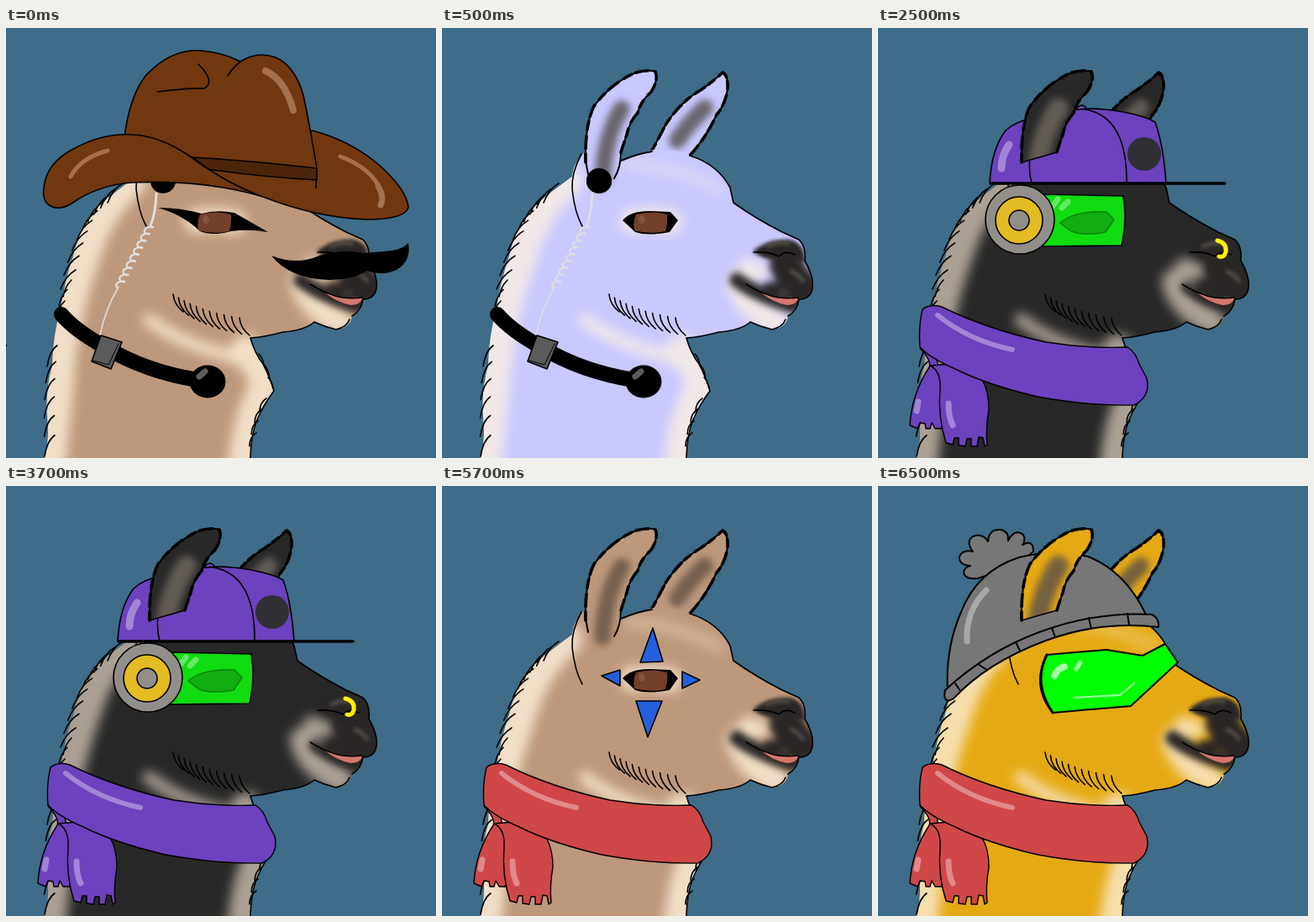
These frames come from a looping animation (512x512 px, 8000 ms). An HTML page:

```html
<!DOCTYPE html>
<html lang="en">
<head>
<meta charset="utf-8">
<title>Llama wardrobe</title>
<style>
html, body { margin: 0; width: 100%; height: 100%; overflow: hidden; background: #3e6c89; }
svg { display: block; width: 100%; height: 100%; }
.ln { fill: none; stroke: #000; stroke-linecap: round; stroke-linejoin: round; }
.ol { stroke: #000; stroke-linejoin: round; }
.base { fill: var(--base); }
.lit { fill: none; stroke: var(--lit); stroke-linecap: round; stroke-linejoin: round; }
.mid { fill: none; stroke: var(--mid); stroke-linecap: round; }
.scarf { fill: var(--scarf); }
.shine { fill: none; stroke: #fff; stroke-opacity: .36; stroke-linecap: round; }
.glint { stroke-opacity: .65; }
</style>
</head>
<body>
<svg viewBox="0 0 512 512" stroke-width="1.6">
<defs>
  <filter id="soft" filterUnits="userSpaceOnUse" x="0" y="0" width="512" height="512"><feGaussianBlur stdDeviation="7"/></filter>
  <filter id="blur" filterUnits="userSpaceOnUse" x="0" y="0" width="512" height="512"><feGaussianBlur stdDeviation="4.5"/></filter>
  <filter id="edge" filterUnits="userSpaceOnUse" x="0" y="0" width="512" height="512"><feGaussianBlur stdDeviation="2"/></filter>
  <path id="bodyShape" d="M46 512Q52 490 49 462Q47 430 55 402Q56 365 65 335Q70 300 80 272Q88 235 110 212Q130 195 155 177Q157 158 171 147L213 146L214 157Q235 149 252 145Q280 143 295 152Q328 162 343 190L347 208Q372 226 405 243L425 252Q434 261 432 277Q445 300 440 314Q437 323 425 323Q423 337 412 343Q410 357 393 359Q380 356 367 350Q356 360 330 362Q308 368 291 369Q296 387 306 400Q314 415 319 432Q306 450 301 462Q292 480 291 512Z"/>
  <path id="earShape" d="M171 160Q170 115 181 93Q202 65 231 53Q247 49 254 52Q258 62 249 76Q236 88 233 101Q223 112 220 127Q216 138 213 148Z"/>
  <path id="earLine" d="M171 160Q170 115 181 93Q202 65 231 53Q247 49 254 52Q258 62 249 76Q236 88 233 101Q223 112 220 127Q216 138 213 148"/>
  <path id="farLine" d="M250 146L267 114Q285 87 308 74Q325 62 334 53Q341 56 340 73Q337 92 327 103Q315 130 294 153"/>
  <clipPath id="bodyClip"><use href="#bodyShape"/></clipPath>
  <clipPath id="earClip"><use href="#earShape"/></clipPath>
  <clipPath id="farClip"><use href="#farLine"/></clipPath>
</defs>

<rect width="512" height="512" fill="#3e6c89"/>
<circle data-on="0" cy="378" r="1.3"/>

<!-- far ear -->
<g data-on="1234">
  <use href="#farLine" class="base"/>
  <g clip-path="url(#farClip)"><path class="mid" d="M280 134Q294 113 313 95" stroke-width="20" filter="url(#blur)"/></g>
  <use href="#farLine" class="ln" stroke-width="2"/>
  <use href="#farLine" class="ln" stroke-width="3.6" stroke-dasharray="9 7 14 5"/>
</g>

<!-- head and neck -->
<use href="#bodyShape" class="base"/>
<g clip-path="url(#bodyClip)">
  <g filter="url(#soft)" class="lit">
    <path stroke-width="42" d="M146 182Q108 215 92 270Q70 330 62 395Q58 450 50 520"/>
    <path stroke-width="38" d="M286 384L306 410L308 430Q288 465 283 520"/>
    <path stroke-width="15" d="M170 347Q205 374 252 386Q280 392 298 410"/>
    <path stroke-width="32" d="M354 303Q362 333 398 350"/>
    <path stroke-width="20" d="M364 284L380 290"/>
    <path data-on="013" stroke-width="29" d="M226 230Q246 226 272 231"/>
    <path data-on="134" stroke-width="14" opacity=".4" d="M225 163Q280 165 330 192"/>
  </g>
  <g filter="url(#blur)" fill="none" stroke="#2a2825" stroke-linecap="round">
    <path d="M410 282Q418 300 430 309" stroke-width="40"/>
    <path d="M389 309L400 311" stroke-width="14"/>
    <path data-on="0134" d="M351 300Q371 316 418 331" stroke-width="18"/>
    <path data-on="2" d="M366 309Q385 324 418 332" stroke-width="12"/>
  </g>
  <path d="M370 266Q387 251 414 252Q434 257 431 279Q414 274 404 277Q383 277 370 266Z" fill="#2a2825" filter="url(#edge)"/>
  <path d="M386 261Q398 254 414 257M414 289Q425 293 431 303" fill="none" stroke="#56524a" stroke-width="4" filter="url(#edge)"/>
  <path d="M371 267Q390 266 401 272Q409 264 420 270" class="ln"/>
  <path d="M376 312Q390 320 405 322Q416 319 424 322Q423 329 411 330Q393 327 376 312Z" fill="#d4776c"/>
  <path d="M362 305Q378 315 392 319Q405 323 424 321" class="ln"/>
</g>
<path class="ln" d="M295 152Q328 162 343 190L347 208Q372 226 405 243L425 252Q434 261 432 277Q445 300 440 314Q437 323 425 323Q423 337 412 343M409 347Q406 356 393 359Q380 356 367 350Q356 360 330 362Q308 368 291 369Q296 387 306 400Q314 415 319 432Q306 450 301 462Q292 480 291 512"/>
<path class="ln" d="M166 150Q154 172 155 192Q158 220 167 236"/>
<path class="ln" data-on="13" stroke-width="2" d="M213 158Q235 149 250 147"/>
<g id="fur" class="ln"></g>

<!-- eye -->
<g data-on="013">
  <path data-on="0" d="M181 214Q208 214 233 221Q250 216 272 220Q293 232 312 243Q290 239 268 242Q245 248 231 242Q210 222 181 214Z"/>
  <path data-on="13" d="M215 229Q225 217 250 218L272 219L281 229L271 243Q245 248 230 243Z"/>
  <path d="M231 222Q250 217 268 222Q269 233 266 242Q247 246 229 241Q227 230 231 222Z" fill="#74402b"/>
  <ellipse cx="238" cy="228" rx="4" ry="5" fill="#85533f"/>
</g>
<path data-on="3" class="ol" fill="#2560dc" d="M251 169L263 209L236 210ZM231 256L262 256L245 299ZM190 226L212 219L212 238ZM286 221L307 231L286 241Z"/>

<!-- collar and earpiece -->
<g data-on="01">
  <circle cx="187" cy="182" r="15"/>
  <g fill="none" stroke="#dedede" stroke-linecap="round">
    <path d="M179 197Q178 222 172 235" stroke-width="3"/>
    <path id="coil" stroke-width="2.2"/>
    <path d="M134 308Q118 336 112 365"/>
  </g>
  <path d="M66 341Q82 360 118 380Q166 409 228 419" fill="none" stroke="#000" stroke-width="18" stroke-linecap="round"/>
  <ellipse cx="240" cy="421" rx="21.5" ry="19.5"/>
  <path d="M230 415L237 409" class="shine" stroke-width="7"/>
  <path class="ol" fill="#5b5b5b" d="M113 366L138 374L125 406L102 397Z"/>
  <path class="ln" stroke-width="1" d="M134 376L122 401L104 396"/>
</g>

<!-- scarf -->
<g data-on="234">
  <g class="ol" stroke-width="1.4">
    <path class="scarf" d="M50 381Q64 396 61 404Q40 436 38 473L47 477L50 470L56 471L57 477L62 477L64 470L68 477L76 477V420L70 395Z"/>
    <path class="scarf" d="M62 402Q75 408 74 430Q71 463 81 494L89 496L91 488L96 488V497L104 498L106 489L111 489V498L118 498L120 487L125 488L127 498L130 496Q128 476 132 454Q132 432 124 419L85 400Z"/>
    <path class="scarf" d="M53 335Q62 328 76 332Q130 359 200 374Q250 382 297 380Q307 386 311 400L320 417Q325 439 305 449Q250 450 190 439Q130 425 92 406Q62 393 50 380Q48 355 53 335Z"/>
  </g>
  <path class="shine" stroke-width="6" d="M71 342Q108 372 160 383"/>
  <path class="shine" stroke-width="7" d="M84 447Q84 464 89 473M48 445L46 456"/>
</g>

<!-- cowboy hat and moustache -->
<g data-on="0">
  <g class="ol" fill="#71370e">
    <path d="M364 122Q408 133 443 162Q478 193 479 214Q474 228 430 228Q370 226 306 201L350 150Z"/>
    <path d="M141 130Q147 82 166 57Q197 24 232 27Q258 29 279 40Q299 27 321 35Q344 45 354 80Q360 107 370 166L369 191L306 201L200 160Z" stroke="none"/>
    <path d="M141 130Q147 82 166 57Q197 24 232 27Q258 29 279 40Q299 27 321 35Q344 45 354 80Q360 107 370 166L369 191" fill="none"/>
    <path fill="#4c2509" d="M222 154Q295 158 370 167V181Q300 177 240 168Z"/>
    <path d="M45 190Q48 160 82 143Q116 125 150 127Q182 128 218 152Q260 184 306 201Q235 180 150 184Q109 187 78 209Q62 219 50 210Q43 204 45 190Z"/>
  </g>
  <path class="ln" d="M180 76Q220 71 236 72Q250 64 229 43M264 57Q270 47 279 40"/>
  <g fill="none" stroke="#a4714f" stroke-linecap="round">
    <path stroke-width="8" d="M309 51Q332 61 342 98"/>
    <path stroke-width="5" d="M77 177Q88 155 121 146M398 153Q436 167 447 195"/>
    <path stroke-width="7" d="M443 188Q451 202 446 211"/>
  </g>
  <path d="M316 271Q346 283 373 271Q401 263 426 268Q438 267 459 265Q473 263 479 256Q483 277 465 288Q447 296 430 289Q416 299 385 300Q338 299 316 271Z"/>
</g>

<!-- cap -->
<g data-on="2">
  <path class="ol" fill="#6c42be" d="M236 98Q238 92 243 92Q248 93 249 98Z"/>
  <path class="ol" fill="#6c42be" d="M133 185Q135 144 152 122Q164 111 185 107Q240 93 270 97Q310 101 330 112Q340 140 343 185Z"/>
  <path class="ln" d="M183 185Q179 170 181 154M247 97Q297 106 296 185"/>
  <path class="ln" stroke-width="3.5" d="M134 185H413"/>
  <path class="shine" stroke-width="9" d="M156 139Q147 152 147 167"/>
  <circle cx="317" cy="150" r="20" fill="#2f2f34"/>
</g>

<!-- headset and nose ring -->
<g data-on="2">
  <path class="ol" fill="#10dc10" d="M197 198L292 200Q297 230 290 259L195 260Z"/>
  <path d="M217 232Q235 217 272 219L281 228L271 243Q245 248 230 242Z" fill="#10ae10" stroke="#0a850a"/>
  <path class="shine" stroke-width="7" d="M208 212L214 204M219 214L226 207"/>
  <g class="ol">
    <circle cx="169" cy="228" r="41" fill="#928e89"/>
    <circle cx="168" cy="229" r="28" fill="#e3bb22"/>
    <circle cx="168" cy="229" r="12" fill="#928e89"/>
  </g>
  <path d="M404 253Q416 256 414 267Q412 274 406 272" fill="none" stroke="#ffef00" stroke-width="5" stroke-linecap="round"/>
</g>

<!-- beanie and visor -->
<g data-on="4" stroke-width="2">
  <path class="ol" fill="#777" d="M119 110Q103 112 102 102Q104 96 110 95Q96 94 97 84Q101 75 113 78Q104 66 113 60Q125 56 131 66Q132 51 146 52Q156 54 155 65Q162 51 172 57Q177 63 172 70Q185 63 185 78L165 95Z"/>
  <path class="ol" fill="#777" d="M83 245Q80 193 99 150Q118 101 168 85Q213 74 250 84Q294 101 319 153Q200 160 83 245Z"/>
  <path class="ol" fill="#777" d="M80 243Q130 197 192 174Q260 149 326 153Q335 157 334 168Q265 160 200 184Q130 210 90 253Q81 259 79 250Z"/>
  <path class="ln" d="M92 235L98 244M119 212L130 219M164 186L169 196M207 169L211 180M251 157L254 170M297 152L299 165"/>
  <path class="shine" stroke-width="7" d="M129 124Q104 149 106 185"/>
  <path class="ol" fill="#0f0" d="M201 201L272 195L315 202L342 188L357 210L301 262L208 270Q182 238 201 201Z"/>
  <path class="ln" stroke-width="3" d="M201 201Q184 235 208 270"/>
  <path class="shine glint" stroke-width="8" d="M210 226Q213 218 222 215"/>
  <path class="shine glint" stroke-width="5" d="M236 218L241 210"/>
  <path class="shine glint" d="M233 252L288 249L305 235"/>
</g>

<!-- near ear -->
<g data-on="1234">
  <use href="#earShape" class="base"/>
  <path data-on="13" class="mid" stroke-width="20" filter="url(#blur)" d="M191 180Q194 128 214 96"/>
  <g data-on="24" clip-path="url(#earClip)"><path class="mid" stroke-width="24" filter="url(#blur)" d="M190 165Q194 128 215 95"/></g>
  <use href="#earLine" class="ln" stroke-width="2"/>
  <use href="#earLine" class="ln" stroke-width="3.6" stroke-dasharray="10 6 15 8"/>
  <path data-on="13" class="ln" stroke-width="2" d="M171 158L174 174M213 148Q213 166 205 179"/>
  <path data-on="24" class="ln" d="M171 160L213 148"/>
  <circle data-on="1" cx="187" cy="182" r="15"/>
</g>
</svg>

<script>
const svg = document.querySelector('svg');
const scenes = [
  { end: 500, base: '#bd987b', lit: '#f0dec6', mid: '#6b5646' },
  { end: 2500, base: '#c9c8ff', lit: '#f2e8e8', mid: '#6a6670' },
  { end: 4500, base: '#282828', lit: '#aaa094', mid: '#625c55', scarf: '#6c42be' },
  { end: 6500, base: '#bd987b', lit: '#f0dec6', mid: '#75604f', scarf: '#cf4747' },
  { end: 8000, base: '#e5a913', lit: '#f5deac', mid: '#756141', scarf: '#cf4747' }
];

// Row of n curved hairs along the quadratic a-c-b
function hairs(a, c, b, n, curl) {
  let d = '';
  for (let i = 0; i < n; i++) {
    const t = i / (n - 1), u = 1 - t;
    const at = k => (u * u * a[k] + 2 * u * t * c[k] + t * t * b[k]).toFixed(1);
    d += `M${at(0)} ${at(1)}q${curl}`;
  }
  return `<path d="${d}"/>`;
}
document.getElementById('fur').innerHTML =
  hairs([199, 317], [230, 338], [278, 345], 11, '1 12 12 21') +
  hairs([139, 185], [100, 210], [83, 288], 10, '-12 7 -18 23') +
  hairs([78, 300], [72, 310], [70, 325], 3, '-8 8 -10 20') +
  hairs([61, 378], [56, 425], [58, 485], 6, '-9 6 -12 25') +
  hairs([301, 388], [308, 400], [312, 416], 3, '5 5 6 13') +
  hairs([310, 441], [300, 460], [298, 482], 4, '-8 5 -8 16');

let coil = 'M172 235';
for (let s = 0; s <= 1; s += 0.005) {
  const a = s * Math.PI * 18;
  coil += `L${(172 - 38 * s + 4 * Math.sin(a)).toFixed(1)} ${(235 + 73 * s + 2 * Math.cos(a)).toFixed(1)}`;
}
document.getElementById('coil').setAttribute('d', coil);

const parts = [...svg.querySelectorAll('[data-on]')];
let shown = -1;
function draw(now) {
  const t = now % 8000;
  const i = scenes.findIndex(s => t < s.end);
  if (i !== shown) {
    shown = i;
    for (const key of ['base', 'lit', 'mid', 'scarf'])
      svg.style.setProperty('--' + key, scenes[i][key] || 'none');
    for (const p of parts) p.style.display = p.dataset.on.includes(i) ? '' : 'none';
  }
  requestAnimationFrame(draw);
}
draw(performance.now());
</script>
</body>
</html>
```
